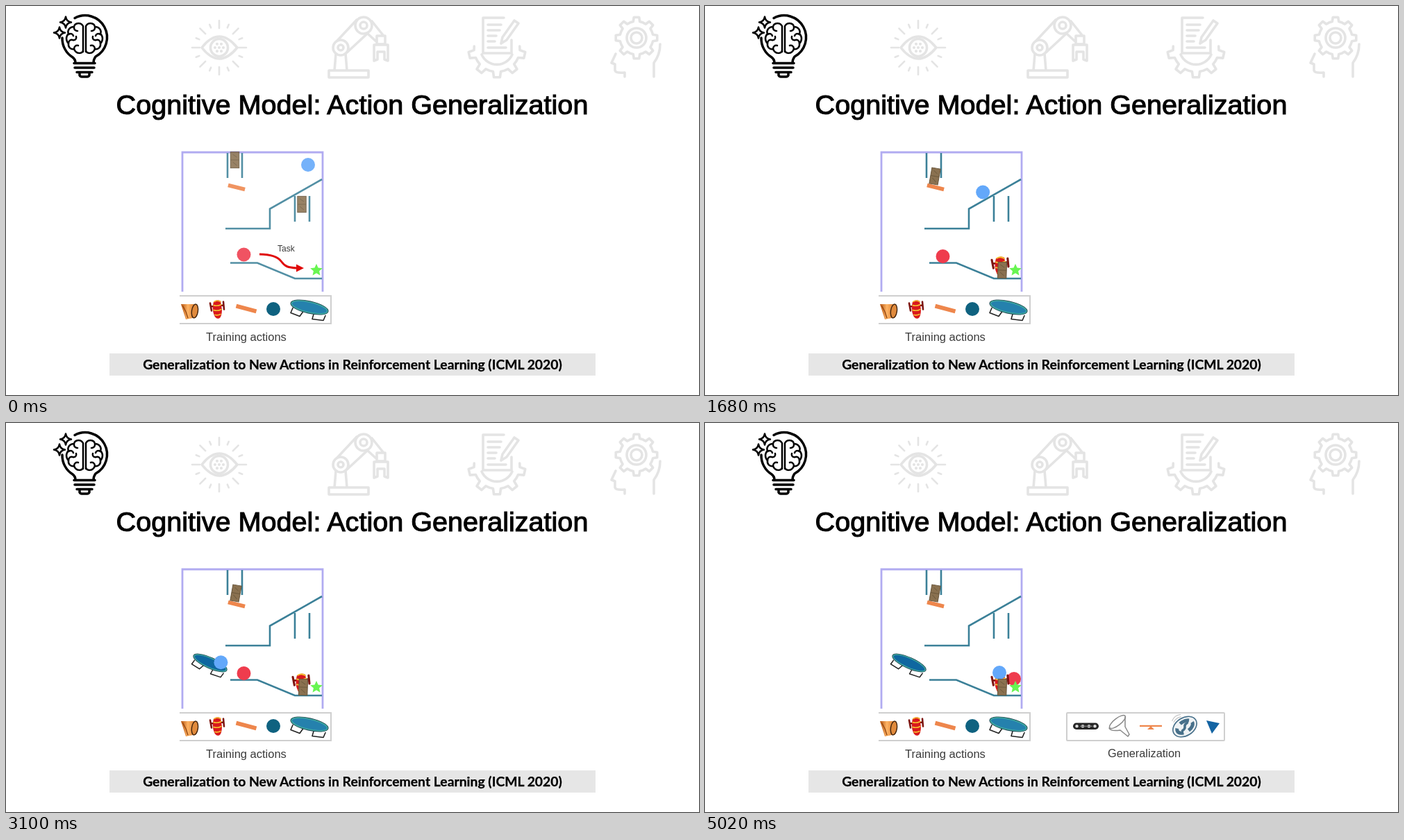
Write an HTML page that moves like this. It is 998 px wide and 561 px high and loops after 5100 ms.

```html
<!DOCTYPE html>
<html lang="en">
<head>
<meta charset="utf-8">
<title>Action Generalization</title>
<style>
html, body { margin: 0; width: 100%; height: 100%; overflow: hidden; background: #fff; }
svg { display: block; width: 100vw; height: 100vh; }
text { font-family: "Liberation Sans", Arial, sans-serif; fill: #3a3a3a; }
.mid { text-anchor: middle; }
.title { fill: #000; stroke: #000; stroke-width: 1.1; }
.cite { font-family: Lato, sans-serif; font-weight: 700; fill: #000; stroke: #000; stroke-width: .25; }
.line { fill: none; stroke-linejoin: round; stroke-linecap: round; }
.pale { stroke: #e4e4e4; stroke-width: 3.6; }
</style>
</head>
<body>
<svg viewBox="0 0 998 561">
  <defs>
    <filter id="glow" x="-30%" y="-40%" width="160%" height="180%"><feGaussianBlur stdDeviation="1.6"/></filter>
    <linearGradient id="copper">
      <stop stop-color="#b5520f"/><stop offset=".4" stop-color="#ffb566"/><stop offset="1" stop-color="#c85f12"/>
    </linearGradient>
    <g id="brainHalf">
      <path d="M111 66V29c-3-6-12-5-13 1c-7 0-10 6-8 10c-4 4-4 10 0 14c-1 6 4 9 8 8c3 8 12 7 13 2"/>
      <path d="M98 31c0 3 2 5 5 5M90 41c3-2 6-1 7 2M90 54c0-4 3-6 6-5c4 1 6-2 5-5M98 62c0-4 3-6 6-5"/>
    </g>
    <path id="spark" d="M0-8Q1-1 8 0Q1 1 0 8Q-1 1-8 0Q-1-1 0-8z"/>
    <g id="trampoline">
      <path class="line" stroke="#222" stroke-width="1.6" d="M-24 1L-27 8L-14 13L-9 6M6 10L4 17L20 19L23 12"/>
      <ellipse rx="27" ry="8" transform="rotate(13)" stroke="#1c3f4d" stroke-width="2.4"/>
      <ellipse rx="26.5" ry="7.5" transform="rotate(13)" stroke="#3eaaa0" stroke-width="1.6"/>
    </g>
    <g id="drum">
      <path class="line" stroke="#7d1510" stroke-width="2.6" d="M-9-4L9-6M-10-9L-8 2M9-11L10 0"/>
      <path d="M-5-11Q0-15 5-12L7 0Q7 11 3 13Q-2 14-4 9Q-8 0-5-11z" fill="#d9191c"/>
      <path class="line" stroke="#f6c431" stroke-width="1.6" d="M-4-11Q0-14 5-11M-5-6Q0-4 6-7M-5 1Q1 3 6 0M-3 8Q1 9 5 7"/>
    </g>
    <g id="block">
      <rect x="-6.2" y="-11.6" width="12.4" height="23.2" fill="#8a7150" stroke="#66543a"/>
      <path d="M-6 0H6M-3-8L3-4M-3 3L3 8" stroke="#6a573b" stroke-width=".9"/>
    </g>
    <rect id="plank" x="-15" y="-3" width="30" height="6" fill="#ee864c"/>
  </defs>

  <!-- header icons -->
  <g class="line" stroke="#000" stroke-width="3.5">
    <path d="M99 17.5A31 31 0 0 1 129 73Q126 77 126 82M81 46A32 32 0 0 0 96 74Q100 77 100 82M98 82.5H128M99 89H127M102 95.5H124M106 96v4q1 2 3 2h8q2 0 3-2v-4"/>
    <g stroke-width="2.5">
      <use href="#brainHalf"/>
      <use href="#brainHalf" transform="translate(226)scale(-1 1)"/>
      <use href="#spark" x="86" y="23.5"/>
      <use href="#spark" x="77" y="38.5"/>
    </g>
  </g>
  <g class="line pale">
    <path d="M282 60Q307 28 333 60Q307 92 282 60z"/>
    <circle cx="307" cy="60" r="12.5"/>
    <path id="rays" stroke-width="2.6"/>
    <path id="dots" stroke-width="4.2"/>

    <path d="M465 93H522V103H465zM473 93L475 69M491 93L489 69M477 50L505 20M491 67L519 41M527 22L543 42M521 40L533 51M534 43h12v12h-12zM530 56h20v23l-5-2v-11h-10v11l-5 2z"/>
    <circle cx="482" cy="60" r="11"/><circle cx="482" cy="60" r="4"/>
    <circle cx="515" cy="28" r="12"/><circle cx="515" cy="28" r="5"/>

    <path d="M728 49V68H687V17H717M694 27H713M694 35H711M694 43H706M694 51H704M694 60H720M713 54L715 45L732 21L738 25L721 49zM685 70A24 24 0 0 0 729 70"/>
    <path id="halfGear"/>
    <path id="headGear"/>
    <circle cx="908" cy="46" r="14"/><circle cx="908" cy="46" r="8"/>
    <path d="M878 69L872 82L877 84V93Q878 97 891 96V102M942 55Q942 70 933 82V102"/>
  </g>

  <text class="mid title" x="498.5" y="155.5" font-size="39.6">Cognitive Model: Action Generalization</text>
  <rect x="149" y="501" width="700" height="32" fill="#e6e6e6"/>
  <text class="mid cite" x="499" y="523.5" font-size="19.35">Generalization to New Actions in Reinforcement Learning (ICML 2020)</text>

  <!-- training tools -->
  <path d="M250 418H468V458H250" fill="none" stroke="#cfcfcf" stroke-width="2"/>
  <g id="pick">
    <rect x="326" y="423.5" width="40" height="25" fill="#fdfbdc" stroke="#f5e94e" stroke-width="6" filter="url(#glow)"/>
    <rect x="326.5" y="424" width="39" height="24" fill="none" stroke="#eedd3c" stroke-width="1.6"/>
  </g>
  <g transform="translate(265 439)">
    <path d="M-13-9L10-9Q14 0 9 10L-6 13z" fill="url(#copper)"/>
    <ellipse cx="7" rx="4.5" ry="10" fill="#e08a3c" stroke="#40240f" stroke-width="1.4" transform="rotate(8)"/>
    <path class="line" d="M-10-6Q-5 2-3 11" stroke="#8a3f0c" stroke-width="1.2"/>
  </g>
  <use href="#drum" x="304" y="437.5"/>
  <use href="#plank" transform="translate(346 436.5)rotate(15)"/>
  <circle cx="385" cy="437" r="10" fill="#0f6280"/>
  <use href="#trampoline" x="437" y="434.5" fill="#2581ad"/>
  <text x="288" y="483" font-size="16.5">Training actions</text>

  <!-- puzzle -->
  <path d="M254 412V211H456V412" fill="none" stroke="#b1abf1" stroke-width="2.8"/>
  <use id="bouncer" href="#trampoline" transform="translate(294 346)rotate(12)scale(.95 .9)" fill="#0f67a0"/>
  <g id="scene">
    <path d="M319 212V248M340 212V248M455 250L380 292.5V321H316M416 274V311M437 274V311M323 370.5H362L416 393H455" fill="none" stroke="#3b8098" stroke-width="2.6"/>
    <use href="#plank" transform="translate(332 261.5)rotate(14)scale(.83 .95)"/>
    <circle id="red" r="10" fill="#ef3c4d"/>
    <use id="prop" href="#drum" transform="translate(425 376)scale(1.2 1.1)"/>
    <circle id="blue" r="10" fill="#63a8fa"/>
    <use id="upper" href="#block"/>
    <use id="lower" href="#block"/>
  </g>
  <path id="star" fill="#68f551"/>
  <g id="task">
    <text x="391" y="354" font-size="12">Task</text>
    <path d="M365 358C383 358 392 362 397 369S406 377 419 378" fill="none" stroke="#e00a0a" stroke-width="3"/>
    <path d="M418 372.5L429 378L418 383.5z" fill="#e00a0a"/>
  </g>
  <g id="action">
    <text x="269" y="247" font-size="12.4">Action</text>
    <path d="M274 256.4H296V252.5L307 258L296 263.5V259.6H274z" fill="#e00a0a"/>
  </g>

  <!-- unseen tools -->
  <g id="unseen">
    <rect x="521" y="418" width="227" height="40" rx="1" fill="none" stroke="#cfcfcf" stroke-width="2"/>
    <rect x="530" y="432.5" width="37" height="9.5" rx="4.7" fill="#252525"/>
    <path class="line" d="M535.5 437.3h0M544 437.3h0M553 437.3h0M561.5 437.3h0" stroke="#ddd" stroke-width="4.6"/>
    <path d="M540 437.3H558" stroke="#777" stroke-width="1.5"/>
    <g class="line" stroke="#888" stroke-width="1.5">
      <ellipse cx="594" cy="431" rx="14" ry="5" transform="rotate(-38 594 431)"/>
      <path d="M582 440Q584 445 598 443L609 452L611 449L605 438V424"/>
    </g>
    <path d="M626 435.8H658V438H626zM642 437L647 442H637z" fill="#ee864c"/>
    <g class="line" stroke="#47708a" transform="translate(691 438)rotate(-32)">
      <ellipse rx="18.5" ry="13" fill="#eef2f4" stroke-width="1.6"/>
      <ellipse rx="12.5" ry="7.5" stroke-width="5" stroke-linecap="butt" stroke-dasharray="14 8"/>
      <path d="M-6 3Q-1 3 0 0T6-3" stroke-width="3.5"/>
      <path d="M-11-17Q-3-22 4-18M-10-14Q-3-18 3-15" stroke="#bbb" stroke-width="1"/>
    </g>
    <path d="M722 429L741 433L730 448z" fill="#1464a3"/>
    <text x="580" y="482" font-size="16.3">Generalization</text>
  </g>
</svg>
<script>
const $ = id => document.getElementById(id);
const polar = (cx, cy, r, a) => `${cx + r * Math.cos(a)} ${cy + r * Math.sin(a)}`;
const ring = (n, f) => Array.from({ length: n }, (_, i) => f(i * 2 * Math.PI / n, i)).join('');

// Outline of `count` teeth, each spanning `step` radians from `start`
function gear(cx, cy, r, depth, count, start, step) {
  const pts = [];
  for (let i = 0; i < count; i++)
    for (const [f, up] of [[0, 0], [.25, 0], [.34, 1], [.66, 1], [.75, 0], [1, 0]])
      pts.push(polar(cx, cy, r + up * depth, start + (i + f) * step));
  return 'M' + pts.join('L');
}

$('rays').setAttribute('d', ring(16, (a, i) =>
  `M${polar(307, 60, i % 2 ? 31 : 28, a)}L${polar(307, 60, i % 2 ? 36 : 39, a)}`));
$('dots').setAttribute('d', 'M307 60h0' + ring(6, a => `M${polar(307, 60, 6, a)}h0`));
$('headGear').setAttribute('d', gear(908, 46, 24, 6, 8, -Math.PI / 8, Math.PI / 4));
$('halfGear').setAttribute('d', gear(707, 62, 33, 8, 5, -.12, (Math.PI + .24) / 5));
$('star').setAttribute('d', 'M' + ring(10, (a, i) =>
  polar(447, 381, i % 2 ? 4.3 : 9.3, a - Math.PI / 2) + (i < 9 ? 'L' : 'z')));

const ramp = (t, from, to) => Math.min(1, Math.max(0, (t - from) / (to - from)));
const mix = (a, b, f) => a + (b - a) * f;

// Stops along a route: [ms, x, y, true if reached by falling]
const bluePath = [
  [1260, 435, 229], [1390, 434, 248, true], [1760, 391, 274], [1970, 364, 311, true],
  [2340, 318, 311], [2680, 285, 325, true], [3180, 314, 349], [3470, 320, 344],
  [3680, 334, 360, true], [3890, 356, 360], [4310, 396, 373], [4810, 424, 360]
];
const redPath = [[3180, 342.5, 361], [3470, 390, 371], [3680, 407, 368], [4180, 438, 361], [4600, 445, 369]];

function travel(path, t) {
  const i = Math.max(1, path.findIndex(p => p[0] > t));
  const [a, b] = t < path.at(-1)[0] ? [path[i - 1], path[i]] : path.slice(-2);
  const f = ramp(t, a[0], b[0]);
  return [mix(a[1], b[1], f), mix(a[2], b[2], b[3] ? f * f : f)];
}

const place = (id, x, y, turn = 0) =>
  $(id).setAttribute('transform', `translate(${x} ${y})rotate(${turn})`);
const fade = (id, v) => $(id).setAttribute('opacity', v);

function draw(now) {
  const t = now % 5100;
  const start = ramp(t, 1050, 1260);
  const hint = ramp(t, 340, 630) - start;
  const tip = ramp(t, 1260, 1470) ** 2;
  const drop = ramp(t, 1260, 1550) ** 2;

  const [redX, redY] = travel(redPath, t);
  place('red', redX, redY - 2.5 * (1 - start));
  place('blue', ...travel(bluePath, t));
  place('upper', mix(329.5, 331, tip), mix(222, 245.5, tip), 10 * tip);
  place('lower', mix(426, 428, drop), mix(286, 381, drop), 2 * drop);

  fade('task', 1 - ramp(t, 130, 420));
  fade('action', hint);
  fade('pick', hint);
  fade('prop', start);
  fade('scene', mix(.88, 1, start));
  fade('bouncer', ramp(t, 1760, 1970));
  fade('unseen', ramp(t, 4310, 4730));
  requestAnimationFrame(() => draw(performance.now() - begin));
}
const begin = performance.now();
draw(0);
</script>
</body>
</html>
```
